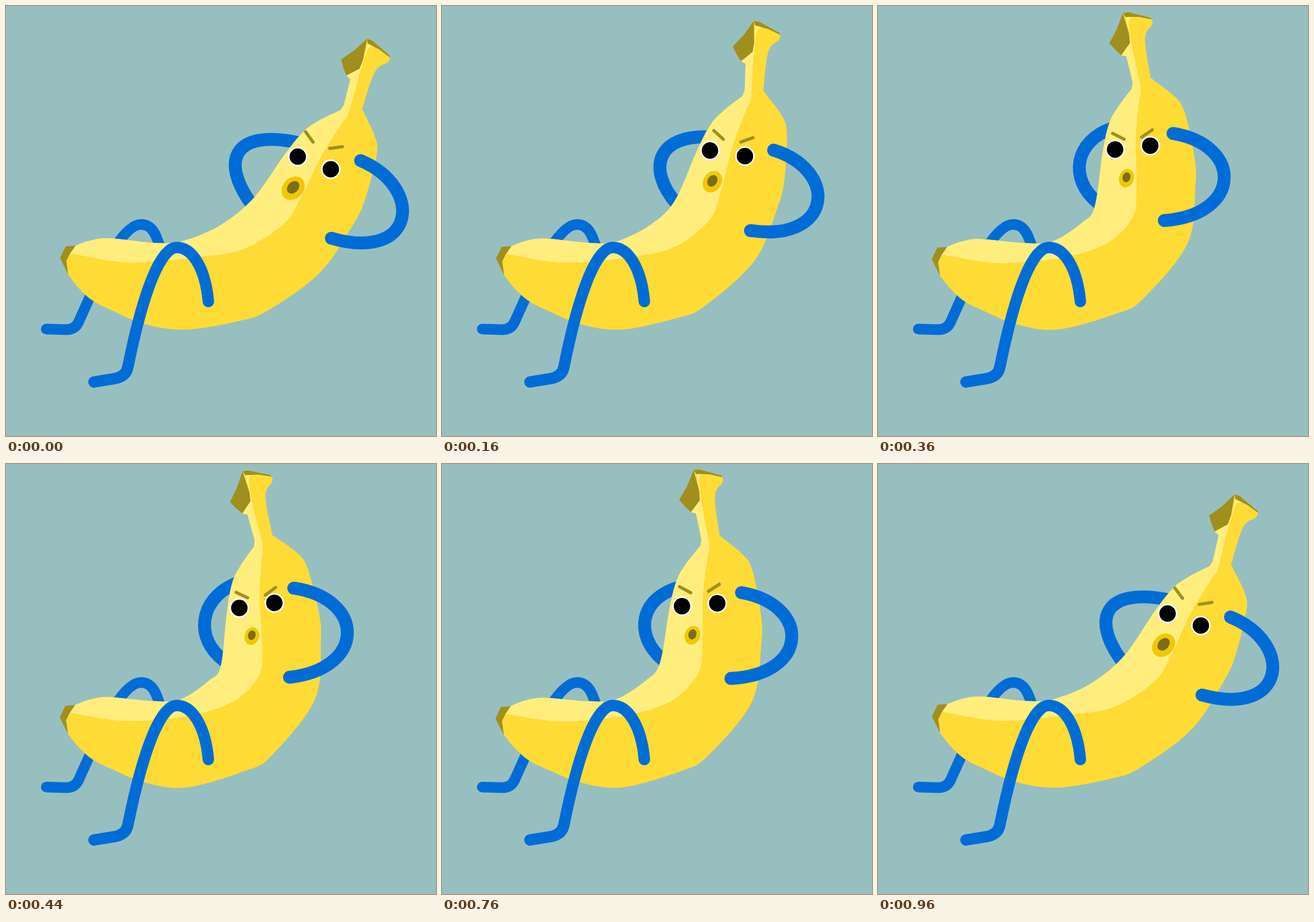
An HTML page with a canvas that plays this animation: 748x748 px, repeating every 1000 ms.

```html
<!DOCTYPE html>
<html lang="en">
<head>
<meta charset="utf-8">
<title>Banana sit-ups</title>
<style>
  html, body { margin: 0; width: 100%; height: 100%; overflow: hidden; background: #98bfbf; }
  canvas { display: block; width: 100vw; height: 100vh; }
</style>
</head>
<body>
<canvas id="stage"></canvas>
<script>
const SIZE = 748, LOOP = 1000, STEP = 40;
const canvas = document.getElementById('stage');
const ctx = canvas.getContext('2d');
const dpr = window.devicePixelRatio || 1;
canvas.width = canvas.height = Math.round(SIZE * dpr);

const C = {
  bg: '#98bfbf', skin: '#ffdb36', light: '#ffee7e', dark: '#a08f1e',
  limb: '#006dd6', lip: '#f0c808', throat: '#7d6d18'
};

// Key points of the banana lying back; bend() makes every other pose.
const TOP = [
  [121,417], [146,408], [180,404], [258,412], [306,409], [370,383],
  [430,335], [485,258], [518,218], [545,199], [582,181]
];
const NECK = [[588,172], [599,127], [592,121]];
const BACK = [
  [668,90], [664,98], [642,114], [621,175], [622,184], [641,225], [645,258],
  [625,335], [603,382], [545,465], [455,530], [405,548], [312,563],
  [240,553], [183,529], [150,512], [126,490], [108,467]
];
const RIDGE = [
  [648,76], [631,74], [613,125], [596,187], [584,205], [548,262], [512,335],
  [482,380], [410,424], [330,437], [235,446], [180,443], [112,430]
];
const TIP = [[104,418], [121,417], [111,431], [105,443], [108,467], [94,438]];
const CUT = [[583,93], [606,77], [628,57], [621,94], [615,109], [592,121], [587,108]];
const RIM = [[628,57], [637,60], [667,86], [668,90], [650,76], [629,65]];
const BROWS = [[[521,218], [534,236]], [[563,247], [585,244]]];
const EYES = [[507.5,262], [565,284]];
const MOUTH = [499.5,317];

// Arms are single curves: lying back, then sitting up.
const ARM_BACK = [
  [[510,238], [395,213], [372,270], [428,346]],
  [[388,207], [332,238], [326,306], [378,342]]
];
const ARM_FRONT = [
  [[617,269], [728,316], [713,446], [566,404]],
  [[492,212], [620,230], [622,352], [491,370]]
];
const LEG_BACK = new Path2D('M70 562L105 563Q121 563 127 548L145 508C170 450 205 380 235 380C255 380 262 400 268 420');
const LEG_FRONT = new Path2D('M153 654L190 648Q209 644 212 628C240 490 270 420 297 420C325 420 347 458 352 514');

const mix = (a, b, k) => a + (b - a) * k;
const clamp = v => Math.min(1, Math.max(0, v));

// Cubic ease with flat ends; x1 and x2 are the handle times.
function ease(u, x1, x2) {
  if (u <= 0) return 0;
  if (u >= 1) return 1;
  let lo = 0, hi = 1, s = 0.5;
  for (let i = 0; i < 30; i++) {
    s = (lo + hi) / 2;
    const r = 1 - s;
    if (3 * r * r * s * x1 + 3 * r * s * s * x2 + s * s * s < u) lo = s; else hi = s;
  }
  return s * s * (3 - 2 * s);
}

const bodyAt = t => t < 560 ? ease(t / 560, 0.33, 0.22) : 1 - ease((t - 560) / 440, 0.78, 0.65);
const armAt = t => t < 600 ? ease(t / 600, 0.26, 0.37) : 1 - ease((t - 600) / 400, 0.51, 0.61);
const tiltAt = t => t > 600 ? 0.8 * Math.sin(Math.PI * (t - 600) / 400) : 0;

// Turns a point anticlockwise around a pivot.
function turn([x, y], cx, cy, deg) {
  const a = deg * Math.PI / 180, c = Math.cos(a), s = Math.sin(a);
  const dx = x - cx, dy = y - cy;
  return [cx + dx * c + dy * s, cy - dx * s + dy * c];
}

const rock = (p, deg) => turn(p, 290, 480, deg);

// Two soft hinges along the body, then a small rocking of the whole.
function bend(p, k, tilt) {
  const along = p[0] - 0.3 * (p[1] - 430);
  let q = turn(p, 490, 452, 20 * k * clamp((along - 425) / 33));
  q = turn(q, 330, 480, 9.2 * k * clamp((along - 310) / 60));
  return rock(q, 0.8 * k + tilt);
}

function lines(path, pts) {
  for (const p of pts) path.lineTo(...p);
}

function smooth(path, pts) {
  path.lineTo(...pts[0]);
  for (let i = 0; i < pts.length - 1; i++) {
    const a = pts[Math.max(i - 1, 0)], b = pts[i], c = pts[i + 1];
    const d = pts[Math.min(i + 2, pts.length - 1)];
    path.bezierCurveTo(
      b[0] + (c[0] - a[0]) / 6, b[1] + (c[1] - a[1]) / 6,
      c[0] - (d[0] - b[0]) / 6, c[1] - (d[1] - b[1]) / 6, c[0], c[1]);
  }
}

function fill(path, color) {
  path.closePath();
  ctx.fillStyle = color;
  ctx.fill(path);
}

function stroke(path, width, color) {
  ctx.lineWidth = width;
  ctx.strokeStyle = color;
  ctx.stroke(path);
}

function oval([x, y], rx, ry, deg, color) {
  ctx.beginPath();
  ctx.ellipse(x, y, rx, ry, deg * Math.PI / 180, 0, 2 * Math.PI);
  ctx.fillStyle = color;
  ctx.fill();
}

// The upper end follows its own timing, the lower end follows the body.
function arm([from, to], t) {
  const pts = from.map(([x, y], i) => {
    const k = mix(armAt(t), bodyAt(t), i / 3);
    return rock([mix(x, to[i][0], k), mix(y, to[i][1], k)], tiltAt(t));
  });
  const path = new Path2D();
  path.moveTo(...pts[0]);
  path.bezierCurveTo(...pts[1], ...pts[2], ...pts[3]);
  stroke(path, 22.5, C.limb);
}

function draw(t) {
  const k = bodyAt(t), tilt = tiltAt(t);
  const at = pts => pts.map(p => bend(p, k, tilt));
  const top = at(TOP), neck = at(NECK);

  ctx.setTransform(canvas.width / SIZE, 0, 0, canvas.height / SIZE, 0, 0);
  ctx.fillStyle = C.bg;
  ctx.fillRect(0, 0, SIZE, SIZE);
  ctx.lineCap = ctx.lineJoin = 'round';

  stroke(LEG_BACK, 18.5, C.limb);
  arm(ARM_BACK, t);

  const skin = new Path2D();
  smooth(skin, top);
  lines(skin, neck);
  lines(skin, at(RIM.slice(0, 3)));
  smooth(skin, at(BACK));
  lines(skin, at([TIP[3], TIP[2]]));
  fill(skin, C.skin);

  const light = new Path2D();
  smooth(light, top);
  lines(light, neck);
  lines(light, at([CUT[4], CUT[3], RIM[5]]));
  smooth(light, at(RIDGE));
  fill(light, C.light);

  for (const part of [TIP, CUT, RIM]) {
    const path = new Path2D();
    lines(path, at(part));
    fill(path, C.dark);
  }

  // The frown runs slightly ahead of the body.
  const frown = bodyAt((t + 60) % LOOP);
  for (const brow of BROWS) {
    const path = new Path2D();
    lines(path, at(brow).map(([x, y]) => [x + 4 * frown, y + 18 * frown]));
    stroke(path, 5.5, C.dark);
  }
  for (const eye of at(EYES)) {
    oval(eye, 17, 17, 0, '#fff');
    oval(eye, 14.3, 14.3, 0, '#000');
  }
  const [mx, my] = bend(MOUTH, k, tilt);
  const mouth = [mx + 2 * k, my - 3 * k], lean = 44 - 30 * k;
  oval(mouth, mix(18, 12.3, k), mix(22.5, 15.5, k), lean, C.lip);
  oval([mouth[0], mouth[1] - 1.5], mix(9.3, 6.5, k), mix(12.3, 8.3, k), lean, C.throat);

  stroke(LEG_FRONT, 20, C.limb);
  arm(ARM_FRONT, t);
}

const start = performance.now();
function tick() {
  const t = (performance.now() - start) % LOOP;
  draw(Math.floor(t / STEP) * STEP);
  requestAnimationFrame(tick);
}
tick();
</script>
</body>
</html>
```
